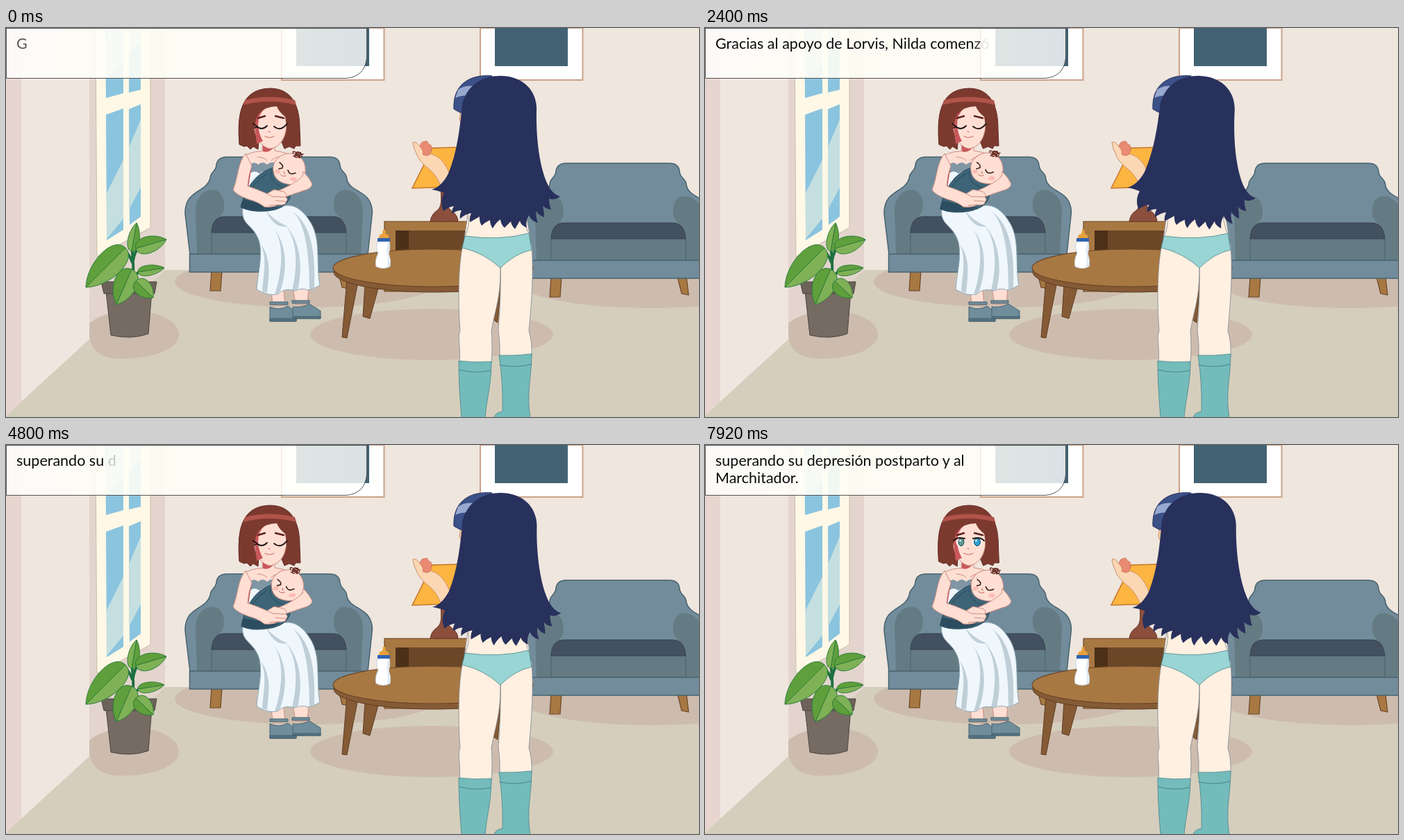
Write an HTML page that moves like this. It is 998 px wide and 561 px high and loops after 8 s.

```html
<!DOCTYPE html>
<html lang="es">
<head>
<meta charset="utf-8">
<title>Sala de estar</title>
<style>
html, body { margin: 0; width: 100%; height: 100%; overflow: hidden; background: #efe6de; }
svg { display: block; width: 100%; height: 100%; }
text { font: 21.5px Lato, "Open Sans", sans-serif; white-space: pre; fill: #0b0b0b; }
.line { fill: none; stroke-linecap: round; }
.skin { fill: #ffdfd3; stroke: #cf8d84; stroke-width: 1; }
.sofa { fill: #728c9b; stroke: #48636f; stroke-width: 1.5; }
.wood { fill: #a87843; stroke: #6b4626; stroke-width: 1.2; }
.leg { fill: #855b36; stroke: #5e3d20; }
.pale { fill: #fff0e1; stroke: #7e8790; stroke-width: .8; }
.teal { fill: #73bcbb; stroke: #4a828a; stroke-width: .8; }
</style>
</head>
<body>
<svg viewBox="0 0 998 561" preserveAspectRatio="none">
<defs>
  <linearGradient id="paper">
    <stop offset="0" stop-color="#fffdfb" stop-opacity=".9"/>
    <stop offset=".4" stop-color="#fffff6" stop-opacity=".88"/>
    <stop offset=".75" stop-color="#fffff9" stop-opacity=".84"/>
    <stop offset="1" stop-color="#fff" stop-opacity=".81"/>
  </linearGradient>
  <g id="couch">
    <path class="wood" d="M296 350h15l-2 29h-15zM478 350h13l3 26-10-2z"/>
    <path class="sofa" d="M265 327L258 268C257 233 288 238 294 217C294 207 303 207 303 197Q305 186 318 186H466Q480 186 481 198C482 209 491 207 491 219C496 238 527 233 527.500 266L521 327Z"/>
    <path fill="#647b83" d="M275 326L273 264C273 240 290 231 302 234C312 237 316 251 313 264L297 290V326ZM511 326L514 264C514 240 495 231 484 234C473 237 470 251 473 264L490 290V326Z"/>
    <path fill="#647b83" stroke="#48636f" d="M296 294H490V326H296Z"/>
    <path fill="#435060" stroke="#36434f" d="M296 295Q297 272 315 272H471Q488 272 490 295Z"/>
    <path class="sofa" d="M264.500 326H521V352H264.500Z"/>
  </g>
</defs>

<!-- room -->
<path fill="#efe6de" d="M0 0H998V561H0Z"/>
<path fill="#f0e6df" d="M0 0H120V561H0Z"/>
<path fill="#e3d5cd" d="M120 0H229V349L120 449Z"/>
<path fill="#d5cebd" d="M0 561V559L229 349H998V561Z"/>
<path fill="#e6d6cf" d="M0 0H22V539L0 559Z"/>
<g fill="#cdbcae">
  <path d="M120 443V426Q140 408 185 408C223 408 249 425 249 442C249 461 217 477 165 477C135 477 121 462 120 443Z"/>
  <ellipse cx="433" cy="366" rx="190" ry="37"/>
  <ellipse cx="930" cy="367" rx="190" ry="37"/>
  <ellipse cx="613" cy="442" rx="175" ry="37"/>
</g>
<path fill="#fff8e6" stroke="#cbbba9" d="M129 0H208V288L131 330Z"/>
<path fill="#8bc4df" d="M143 0H169V94L144 101ZM177 0H194V89L177 93ZM144 125L169 116V291L145 306ZM177 117L194 110V272L178 284Z"/>
<path fill="#c5dfe0" d="M147 0H169V50L144 72V20ZM177 0H194V18L177 40ZM169 190V275L145 304V238ZM194 132V230L177 262V172Z"/>
<g fill="#fff" stroke="#cba287" stroke-width="2">
  <path d="M397 0H544.500V75H397ZM683 0H830.500V75H683Z"/>
  <path fill="#436273" stroke="none" d="M418 0H523V55H418ZM704 0H809V55H704Z"/>
</g>

<!-- plant -->
<path fill="#756b62" stroke="#4d4641" d="M144 380H210L205 441Q180 450 151 443Z"/>
<path fill="#6c6259" stroke="#4d4641" d="M137 366H217L214 383H141Z"/>
<path class="line" stroke="#1d7040" stroke-width="4" d="M182 372Q185 342 181 316M182 338Q176 322 166 317M183 336Q185 322 192 316M182 366Q185 354 196 349"/>
<g id="leaves"></g>

<!-- furniture -->
<use href="#couch"/>
<use href="#couch" x="489" y="9"/>
<path class="wood" d="M545 279H720V380H545Z"/>
<path fill="#6b4728" d="M561 292H720V321H561Z"/>
<path fill="#4c3018" d="M561 292H580V321H561Z"/>
<path fill="#8b4f3c" stroke="#6b3729" d="M626 230H636C636 250 634 258 641 263Q651 270 651 279H611Q612 269 621 263C628 257 627 248 626 230Z"/>
<path fill="#fdb541" stroke="#c5762a" stroke-width="1.5" d="M614 173L655 172L682 228L585 231Z"/>
<path class="leg" d="M517 370L537 372L524 419L514 416ZM700 380H712L708 425L701 420Z"/>
<path class="leg" d="M491 362L507 366L491 447L484 446Z"/>
<ellipse class="leg" cx="615" cy="352" rx="143" ry="29"/>
<ellipse class="wood" cx="615" cy="346" rx="144" ry="27"/>
<path fill="#fff" stroke="#c6d3df" d="M535 308H552Q554 318 551 325Q555 334 553 344Q543 349 533 344Q531 334 536 325Q532 316 535 308Z"/>
<path fill="#dfe9f2" d="M550 310H552Q553 318 550 325Q554 335 552 344L549 345Q551 328 548 322Z"/>
<path fill="#e9a13c" d="M537 303Q537 297 542 297L543 291H546L547 297Q552 298 551 303Z"/>
<path fill="#2f62b2" d="M535 303H553V308H535Z"/>

<!-- seated woman -->
<path class="skin" d="M382 378H400L402 400H384ZM413 374H436L434 398H417Z"/>
<g fill="#6f8d9b" stroke="#46626f">
  <path d="M380 402Q394 408 406 401L418 410V423H380ZM380 395H406V399H380Z"/>
  <path d="M413 402Q425 404 437 398L453 408V419H413ZM412 393H437V397H412Z"/>
  <path fill="#56727f" d="M380 419H418V423H380ZM414 416H453V419H414Z"/>
</g>
<path fill="#eff7fd" stroke="#8fa7b3" d="M341 260C338 286 357 282 365 309C370 332 362 356 361 377Q377 387 391 384Q401 374 416 379Q428 374 434 378Q443 377 452 371C446 340 454 306 439 281Q423 254 403 256Z"/>
<g fill="#bfced7">
  <path d="M374 262Q384 277 405 286Q386 290 374 262Z"/>
  <path d="M367 312C377 334 370 358 369 380L376 382C379 354 382 332 367 312Z"/>
  <path d="M386 290C402 312 397 356 387 384L394 382C406 350 405 312 386 290Z"/>
  <path d="M402 284C422 308 419 350 412 378L420 378C428 345 424 306 402 284Z"/>
  <path d="M412 264C432 280 437 330 437 377L444 375C446 325 440 283 412 264Z"/>
</g>
<path class="skin" d="M344 184Q358 177 369 178L370 164H387V177Q402 179 411 184L402 225L352 225Z"/>
<path fill="#c9575b" d="M370 162H387V171Q379 181 370 178Z"/>
<path class="line" stroke="#cf8d84" d="M362 186Q371 186 376 191M382 191Q388 185 396 186"/>
<path fill="#eff7fd" d="M352 202Q370 215 391 200L398 238H348Z"/>
<path fill="#7f96a5" d="M351 198Q357 191 363 197Q370 191 376 197Q384 190 393 198L390 207Q383 202 377 208Q371 204 365 210Q358 204 351 210Z"/>
<path fill="#c9575b" d="M349 190L354 199L349 230L342 228Z"/>
<g id="baby">
  <path fill="#3d6577" stroke="#2b4d5f" d="M386 201C360 208 345 231 338 258Q351 266 376 264Q402 262 409 245L412 225Z"/>
  <path fill="#2b4d5f" d="M338 259Q339 253 342 247Q362 252 392 259Q365 268 338 259Z"/>
  <path class="line" stroke="#2b4d5f" d="M383 205Q378 222 400 231M378 209Q360 220 352 233"/>
  <path class="skin" d="M385 206C383 190 397 180 411 181C426 183 432 195 431 207C429 222 418 228 405 225C393 223 386 216 385 206Z"/>
  <g fill="#fbbdb4"><ellipse cx="391" cy="207" rx="4" ry="3"/><ellipse cx="414" cy="218" rx="5" ry="3"/></g>
  <path class="line" stroke="#38201d" stroke-width="1.6" d="M394 194Q400 198 398 202L393 203M406 205Q408 213 417 209"/>
  <path class="line" stroke="#c47068" d="M401 207Q398 210 402 210M395 211Q398 215 403 213"/>
  <path class="line" stroke="#65271f" stroke-width="1.4" d="M414 181C410 176 420 178 418 183S426 175 424 181S414 189 416 183S428 180 426 185S414 177 421 179S419 189 423 187M414 185L428 182"/>
</g>
<path class="skin" d="M428 207Q437 216 441 225Q440 232 427 235L401 244L389 236Q416 225 427 214Z"/>
<path class="skin" d="M345 181C333 196 335 214 327 233Q330 240 349 247Q364 251 372 258Q386 259 391 255Q404 256 403 251Q407 247 403 244Q406 239 400 236L386 233L376 239Q360 232 348 228Q349 212 354 199Z"/>
<path class="line" stroke="#cf8d84" d="M386 243L403 244M388 249L402 250M376 239L386 244M379 256L391 255"/>
<g id="bob">
  <path fill="#7c3a2f" stroke="#622b24" d="M336 168C333 128 336 88 380 87C416 87 423 119 423 145L424 170L417 170L415 174L408 171L401 174L396 162H364L363 175L356 171L352 175L347 170L343 171Z"/>
</g>
<path class="skin" stroke="none" d="M356 125Q357 111 381 110Q403 112 404 132C405 158 395 172 380 174C364 171 355 151 356 125Z"/>
<path fill="#c9575b" d="M355 115H374Q363 124 363 140Q364 153 370 163L361 167Z"/>
<path fill="#7c3a2f" d="M342 111Q378 99 418 111L417 145L411 168L403 168Q406 147 402 128Q393 121 390 113Q373 113 364 124Q355 138 358 166L345 168Z"/>
<path fill="#b0534b" d="M344 104Q379 95 416 104L418 111Q379 101 342 111Z"/>
<path class="line" stroke="#5b211d" stroke-width="2.4" d="M363 130L373 127M388 127L400 130"/>
<path class="line" stroke="#c76e68" stroke-width="1.1" d="M378 149L380 150M373 156Q379 160 386 156"/>
<path id="shut" class="line" stroke="#211617" stroke-width="1.8" d="M356 138L360 141Q368 149 376 141M386 142Q394 149 402 141L405 138M358 144L361 143"/>
<g id="open">
  <g fill="#fff"><ellipse cx="368" cy="140" rx="6.5" ry="6.5"/><ellipse cx="392" cy="140" rx="7" ry="6.5"/></g>
  <g stroke="#26383e"><ellipse cx="369" cy="140" rx="4" ry="5.5" fill="#5b9a92"/><ellipse cx="392" cy="140" rx="4.5" ry="5.5" fill="#2da0d4"/></g>
  <g fill="#fff"><circle cx="367.5" cy="138" r="1.4"/><circle cx="390.5" cy="138" r="1.4"/></g>
  <path class="line" stroke="#211617" stroke-width="2" d="M358 138Q363 132 374 135M386 135Q396 132 402 138"/>
</g>

<!-- standing helper -->
<path fill="#fcd7b4" stroke="#c98f6c" d="M586 165Q591 163 594 169L603 174L613 182C629 187 637 202 644 226L626 228Q621 214 611 205Q594 192 591 181Q587 174 586 165Z"/>
<path fill="#e98a72" stroke="#c96d58" stroke-width=".7" d="M596 171Q598 163 602 164Q607 161 608 167Q614 168 613 175L611 182Q606 186 600 182Q602 177 596 171Z"/>
<path fill="#f8cf9f" stroke="#c98f6c" d="M657 105L653 132L657 140L654 150L664 162L690 150V105Z"/>
<path fill="#3b5188" stroke="#28305c" d="M645 117C643 84 665 66 700 69L690 122H654Z"/>
<path fill="#98a9cf" d="M651 89Q664 80 682 86L678 101Q660 94 647 101Z"/>
<path class="pale" d="M712 340C713 388 705 403 699 437Q701 458 699 484H653C655 458 650 446 654 437C651 395 651 345 658 312L757 312C760 352 757 395 753 437Q758 452 757 475H711Q712 455 709 435Q713 390 712 340Z"/>
<path class="pale" stroke="none" d="M666 262H748L755 303Q710 316 660 304Z"/>
<path class="pale" fill="none" d="M666 270Q668 285 661 301M746 270Q748 288 754 299"/>
<path class="teal" style="fill:#98d5d4" d="M661 300Q712 307 753 296L757 320Q733 325 712 346Q688 324 657 317Z"/>
<path class="teal" d="M652 480Q676 483 699 481C699 515 692 535 690 562H656Q652 515 652 480ZM710 472Q735 473 757 470C757 505 749 525 755 562H703Q704 555 715 553Q716 510 710 472Z"/>
<path class="line" stroke="#4a828a" d="M653 493Q676 499 698 494M711 486Q735 491 756 485"/>
<path id="mane" fill="#28305c" d="M657 110C664 82 686 69 712 69C744 69 766 90 764 121C763 175 773 217 784 232Q789 240 798 243Q790 249 782 246Q782 254 785 262Q777 261 773 256Q775 265 775 273Q767 270 764 264Q762 271 766 281Q756 278 753 270Q748 278 750 288Q741 284 740 278Q737 283 733 290Q728 285 727 279Q722 284 718 288Q713 284 712 276Q705 281 701 289Q697 284 697 277Q690 280 685 285Q681 278 682 272Q675 276 668 280Q667 273 670 267Q660 269 654 275Q653 269 656 263Q648 263 643 268Q641 263 645 257Q637 258 630 264Q624 250 631 238Q624 235 613 233Q627 229 637 210C650 178 654 142 657 110Z"/>

<!-- caption -->
<path fill="url(#paper)" stroke="#444" stroke-width=".9" d="M.5 .5H519.5V43Q517 70 490 72.500H.5Z"/>
<text></text>
<text></text>
</svg>

<script>
const $ = id => document.getElementById(id);
const NS = "http://www.w3.org/2000/svg";
const LOOP = 8000, TURN = 3985, STEP = 61.3, FADE = 90;

// leaf blade: base, tip and half width; one half is lighter
function leaf(x, y, tx, ty, w) {
  const len = Math.hypot(tx - x, ty - y);
  const nx = (y - ty) / len * w, ny = (tx - x) / len * w;
  const side = k => `C${x + nx * k} ${y + ny * k} ${(x + 2 * tx) / 3 + nx * k} ${(y + 2 * ty) / 3 + ny * k} ${tx} ${ty}`;
  const half = (k, color) => `<path d="M${x} ${y}${side(k)}Z" fill="${color}" stroke="#2d7c3a"/>`;
  return half(1, "#5f9f3c") + half(-1, "#7fb156");
}
$("leaves").innerHTML = [
  [181, 322, 188, 281, 11], [187, 318, 231, 305, -16], [172, 317, 115, 374, 25],
  [190, 352, 228, 346, -10], [181, 348, 159, 399, 22], [187, 365, 212, 389, 16]
].map(a => leaf(...a)).join("");

const pages = [
  "Gracias al apoyo de Lorvis, Nilda comenzó a sentirse\nmás fuerte,",
  "superando su depresión postparto y al\nMarchitador."
].map((words, n) => {
  const box = document.querySelectorAll("text")[n];
  let wrap = true, y = 30;
  const chars = [...words].map(c => {
    const span = document.createElementNS(NS, "tspan");
    if (c === "\n") { wrap = true; y += 25; return span; }
    if (wrap) { span.setAttribute("x", 15); span.setAttribute("y", y); wrap = false; }
    span.textContent = c;
    return box.appendChild(span);
  });
  return { box, chars };
});

// sideways travel of the hair tip, [ms, px]
const sway = [[0, 0], [1360, -3], [2550, -5.2], [3920, -3], [5680, 6], [6700, 8.6], [8000, 2.5]];
function curve(keys, t) {
  let i = 0;
  while (i < keys.length - 2 && t > keys[i + 1][0]) i++;
  const slope = j => {
    const a = keys[Math.max(0, j - 1)], b = keys[Math.min(keys.length - 1, j + 1)];
    return (b[1] - a[1]) / (b[0] - a[0]);
  };
  const [t0, v0] = keys[i], [t1, v1] = keys[i + 1], d = t1 - t0, u = (t - t0) / d;
  const s = u * u * (3 - 2 * u);
  return v0 + (v1 - v0) * s + d * u * (1 - u) * (slope(i) * (1 - u) - slope(i + 1) * u);
}

const wave = (t, period) => Math.cos(2 * Math.PI * t / period);

function draw(t) {
  const angle = -curve(sway, t) / 172 * 180 / Math.PI;
  $("mane").setAttribute("transform", `rotate(${angle} 712 74)`);
  $("baby").setAttribute("transform", `rotate(${2 * wave(t, 3500) - 2} 390 245)`);
  $("bob").setAttribute("transform", `translate(378 0) scale(${1 + .022 * (wave(t, 4600) - 1) / 2} 1) translate(-378 0)`);
  const awake = t >= 7440;
  $("shut").style.display = awake ? "none" : "";
  $("open").style.display = awake ? "" : "none";

  const page = t < TURN ? 0 : 1, start = page ? TURN : -60;
  pages.forEach(({ box, chars }, n) => {
    box.style.display = n === page ? "" : "none";
    if (n === page) chars.forEach((c, i) =>
      c.setAttribute("fill-opacity", Math.max(0, Math.min(1, (t - start - i * STEP) / FADE))));
  });
}

const begin = performance.now();
function tick() {
  draw((performance.now() - begin) % LOOP);
  requestAnimationFrame(tick);
}
tick();
</script>
</body>
</html>
```
